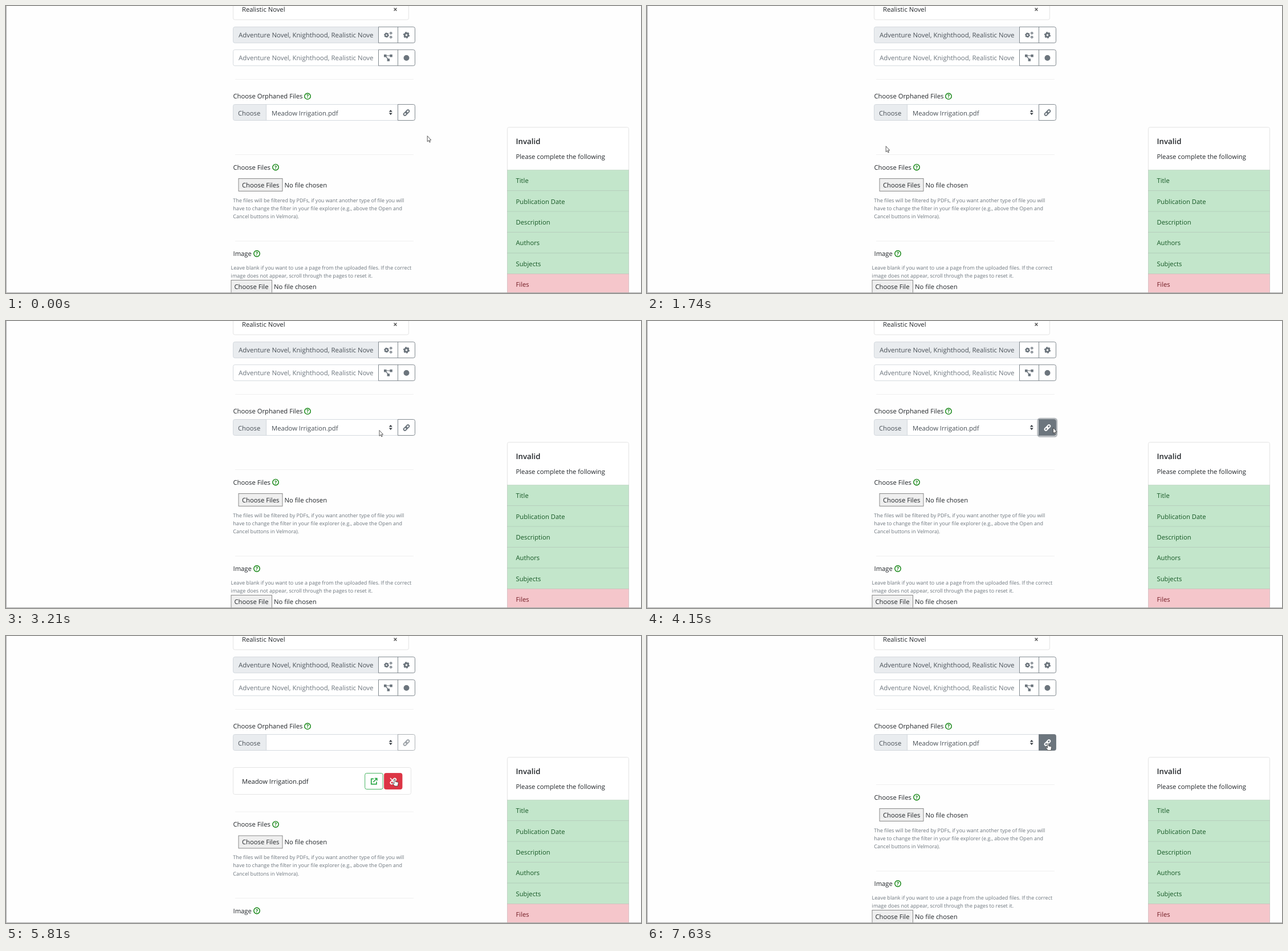
Write an HTML page that moves like this. It is 1114 px wide and 503 px high and loops after 8 s.

```html
<!DOCTYPE html>
<html lang="en">
<head>
<meta charset="utf-8">
<title>Linking orphaned files</title>
<style>
  html, body { margin: 0; width: 100%; height: 100%; overflow: hidden; background: #fefefe; }
  svg { display: block; }
  text { font: 11.25px "Open Sans", "Noto Sans", sans-serif; fill: #212529; text-rendering: geometricPrecision; white-space: pre; }
  .field { fill: #495057; }
  .hint, .soft { fill: #6c757d; }
  .hint { font-size: 9.06px; }
  .list { font-size: 11.46px; }
  .box { fill: #fff; stroke: #ced4da; }
  .card { fill: #fff; stroke: #dfdfdf; }
  .grey { fill: #e9ecef; stroke: #ced4da; }
  .file { fill: #efefef; stroke: #767676; }
  .rule { stroke: #f0f0f0; }
  .btn { fill: #fff; stroke: #6c757d; }
  .box, .card, .grey, .file, .btn, .frame { stroke-width: .85; }
  .line { fill: none; stroke: #6c757d; }
  .solid { fill: #6c757d; }
  .help circle { fill: none; stroke: #0a800a; stroke-width: 1.4; }
  .help text { font-size: 8.6px; font-weight: 700; fill: #0a800a; text-anchor: middle; }
  #link.hover .btn { fill: #6c757d; }
  #link.hover .line { stroke: #fff; }
  #unlink .frame { fill: #fff; stroke: #dc3545; }
  #unlink .icon { fill: none; stroke: #dc3545; }
  #unlink.hover .frame { fill: #dc3545; }
  #unlink.hover .icon { stroke: #fff; }
  #arrow, #hand { fill: #fff; stroke: #333; stroke-width: .8; stroke-linejoin: round; }
</style>
</head>
<body>
<svg width="1114" height="503" viewBox="0 0 1114 503">
  <defs>
    <g id="cog">
      <circle r="3.2" stroke-width="2.9"/>
      <circle r="4.8" stroke-width="1.7" pathLength="12" stroke-dasharray="1.1 .9"/>
    </g>
    <g id="chain" transform="rotate(-45)" stroke-width="1.8">
      <rect x="-6" y="-2.2" width="7" height="4.4" rx="2.2"/>
      <rect x="-1" y="-2.2" width="7" height="4.4" rx="2.2"/>
    </g>
    <g id="help" class="help"><circle r="5.2"/><text y="3.1">?</text></g>
  </defs>

  <rect class="card" x="398.5" y="-20.5" width="308" height="44.5" rx="3"/>
  <text x="414" y="10.2">Realistic Novel</text>
  <path d="M680.6 3.6l4.8 4.8m0-4.8l-4.8 4.8" stroke="#555" stroke-width="1.4"/>

  <rect class="grey" x="398.5" y="36.7" width="258" height="28" rx="3"/>
  <rect class="box" x="398.5" y="76.7" width="258" height="28" rx="3"/>
  <svg width="645" height="110">
    <text class="field list" x="408" y="55">Adventure Novel, Knighthood, Realistic Novel</text>
    <text class="soft list" x="408" y="95">Adventure Novel, Knighthood, Realistic Novel</text>
  </svg>
  <path class="btn" d="M653.5 36.7H714.5a3 3 0 0 1 3 3V61.7a3 3 0 0 1-3 3H653.5ZM687.5 36.7v28"/>
  <path class="btn" d="M653.5 76.7H714.5a3 3 0 0 1 3 3V101.7a3 3 0 0 1-3 3H653.5ZM687.5 76.7v28"/>
  <g class="line">
    <use href="#cog" transform="translate(667.5 51) scale(.78)"/>
    <use href="#cog" transform="translate(675.2 47.6) scale(.43)"/>
    <use href="#cog" transform="translate(675.2 54.6) scale(.43)"/>
    <use href="#cog" transform="translate(702.5 51)"/>
    <path d="M665 87h10M666 88l5 6" stroke-width="1.2"/>
  </g>
  <path class="solid" d="M663 85h4.5v4.5h-4.5zM673.3 85h4.5v4.5h-4.5zM668.6 92.3h4.5v4.5h-4.5z"/>
  <circle class="solid" cx="702.5" cy="91" r="5"/>

  <path class="rule" d="M402 128.5H715"/>
  <text x="398.5" y="162.3">Choose Orphaned Files</text>
  <use href="#help" x="529" y="158.2"/>
  <path class="grey" d="M456.5 172.5H401.5a3 3 0 0 0-3 3V197.5a3 3 0 0 0 3 3H456.5Z"/>
  <rect class="box" x="456.5" y="172.5" width="231" height="28"/>
  <text class="field" x="407" y="191.5">Choose</text>
  <text class="field" id="selected" x="466" y="191.5">Meadow Irrigation.pdf</text>
  <path fill="#343a40" d="M671.8 185.6l3-3.6 3 3.6zM671.8 187.4l3 3.6 3-3.6z"/>
  <g id="link">
    <rect id="ring" x="685.5" y="171" width="33.5" height="31.5" rx="4" fill="none" stroke="#6c757d" stroke-opacity=".5" stroke-width="2.4"/>
    <path class="btn" d="M687.5 172.5H714.5a3 3 0 0 1 3 3V197.5a3 3 0 0 1-3 3H687.5Z"/>
    <g class="line"><use href="#chain" x="702.5" y="187"/></g>
  </g>

  <g id="linked">
    <rect class="card" x="398.5" y="230.5" width="312" height="47" rx="3"/>
    <text x="414" y="258.6">Meadow Irrigation.pdf</text>
    <rect class="frame" x="629.7" y="240.5" width="31.5" height="28" rx="3" fill="#fff" stroke="#28a745"/>
    <path d="M645 250.3h-4.2v9.4h9.2v-4.2M644.3 256l6-6M646.8 249.5h4v4" fill="none" stroke="#28a745" stroke-width="1.7"/>
    <g id="unlink">
      <rect class="frame" x="663.5" y="240.5" width="31.5" height="28" rx="3"/>
      <g class="icon"><use href="#chain" x="679.3" y="254.5"/><path d="M674 249l11 11" stroke-width="1.5"/></g>
    </g>
  </g>

  <g id="lower">
    <path class="rule" d="M402 260.5H715M402 412H715"/>
    <text x="398.5" y="286.8">Choose Files</text>
    <use href="#help" x="473" y="282.6"/>
    <rect class="file" x="408" y="302.5" width="77" height="22"/>
    <text x="414" y="317.8">Choose Files</text>
    <text x="488.5" y="317.8">No file chosen</text>
    <text class="hint" x="398.3" y="343.6">The files will be filtered by PDFs, if you want another type of file you will</text>
    <text class="hint" x="398.3" y="357.8">have to change the filter in your file explorer (e.g., above the Open and</text>
    <text class="hint" x="398.3" y="372">Cancel buttons in Velmora).</text>
    <text x="398.5" y="438.2">Image</text>
    <use href="#help" x="440" y="434"/>
    <text class="hint" x="394.6" y="462">Leave blank if you want to use a page from the uploaded files. If the correct</text>
    <text class="hint" x="394.6" y="476.2">image does not appear, scroll through the pages to reset it.</text>
    <rect class="file" x="395" y="480.5" width="71.5" height="22"/>
    <text x="400.5" y="495.8">Choose File</text>
    <text x="470" y="495.8">No file chosen</text>
  </g>

  <rect class="card" x="879.5" y="212.5" width="213" height="300" rx="3"/>
  <text x="894.5" y="242" style="font-size:13.3px;font-weight:600">Invalid</text>
  <text x="894.5" y="268">Please complete the following</text>
  <g id="checks"></g>

  <path d="M.5 0V502.5H1114" fill="none" stroke="#a9a9a9"/>
  <g id="pointer">
    <path id="arrow" d="M0 0V10L2.2 7.9L3.8 11.3L5.2 10.6L3.7 7.3H6.6Z"/>
    <path id="hand" d="M-1.1 .9C-1.1-.4 1.1-.4 1.1 .9V4.3L5 5.1C6 5.3 6.4 5.9 6.2 6.9L5.3 12H-.2L-3.6 7.6C-4.1 6.6-3 6.1-2.3 6.7L-1.1 7.9Z"/>
  </g>
</svg>
<script>
const el = id => document.getElementById(id);
const show = (id, on) => el(id).setAttribute('visibility', on ? 'visible' : 'hidden');
const between = (v, a, b) => v >= a && v < b;

el('checks').innerHTML = ['Title', 'Publication Date', 'Description', 'Authors', 'Subjects', 'Files']
  .map((name, i) => {
    const y = 287.3 + i * 36.45, missing = name === 'Files';
    return `<rect x="879.5" y="${y}" width="213" height="36.45" fill="${missing ? '#f5c6cb' : '#c3e6cb'}"
        stroke="#000" stroke-opacity=".1" stroke-width=".8"/>
      <text x="894.5" y="${y + 22.8}" style="fill:${missing ? '#721c24' : '#155724'}">${name}</text>`;
  }).join('');

// Pointer moves: start time, ms per step, then one x,y per step
const moves = [
  [0, 1, 739.2, 227.7],
  [810, 132, 725, 172, 640, 125, 520, 116, 420, 136, 362, 172, 353, 210, 378, 236, 419.2, 245.7],
  [1860, 132, 400, 255, 391, 272, 420, 285, 490, 280, 570, 262, 645, 232, 703, 202, 692, 224],
  [2910, 140, 662, 216, 639, 200, 655, 191.5, 672, 190, 689, 188, 704, 187, 712, 187],
  [4000, 145, 712, 187, 712.5, 187, 712, 187, 711, 190, 708, 196, 704, 203, 698.7, 211.5, 692, 225],
  [5170, 120, 685, 242, 682, 250, 681, 252],
  [5810, 1, 682, 251],
  [6240, 1, 681.5, 250.5],
  [6640, 141, 682, 249, 684, 242, 688, 231, 693, 219, 698, 207, 701, 198, 703, 191, 703.5, 188.5],
];

function pointerAt(t) {
  const [start, step, ...path] = moves.findLast(m => m[0] <= t);
  const i = Math.min(Math.floor((t - start) / step), path.length / 2 - 1);
  return [path[2 * i], path[2 * i + 1]];
}

function draw(now) {
  const t = now % 8000, [x, y] = pointerAt(t);
  const linked = between(t, 4300, 6240), busy = between(t, 4140, 4300);
  const overLink = !linked && between(x, 687, 718) && between(y, 173, 201);
  const overUnlink = linked && between(x, 664, 695) && between(y, 240, 269);
  const hand = overUnlink || (overLink && !busy);

  show('selected', !linked);
  show('linked', linked);
  show('ring', between(t, 4000, 4300));
  show('hand', hand);
  show('arrow', !hand);
  el('link').setAttribute('class', overLink ? 'hover' : '');
  el('link').setAttribute('opacity', linked ? .65 : 1);
  el('unlink').setAttribute('class', overUnlink ? 'hover' : '');
  el('lower').setAttribute('transform', `translate(0 ${linked ? 47.5 : 0})`);
  el('pointer').setAttribute('transform', `translate(${x} ${y})`);
  requestAnimationFrame(draw);
}
requestAnimationFrame(draw);
</script>
</body>
</html>
```
